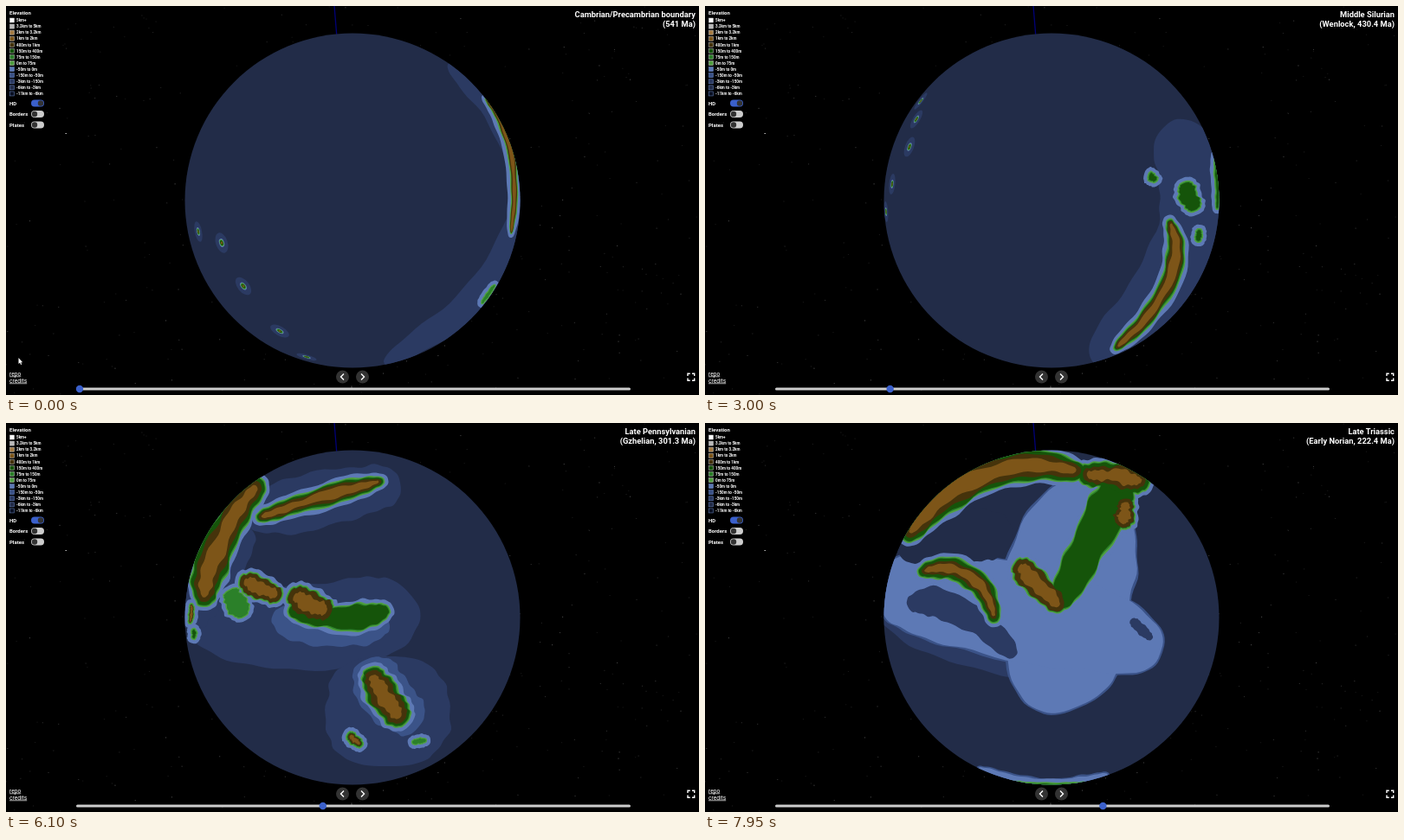
Animation of 800x450 px, one loop 8000 ms. Source, as an HTML page with a canvas:

```html
<!DOCTYPE html>
<html lang="en">
<head>
<meta charset="utf-8">
<title>Paleogeographic globe</title>
<style>
html, body { margin: 0; width: 100%; height: 100%; overflow: hidden; background: #000; }
canvas, svg { position: absolute; left: 0; top: 0; width: 800px; height: 450px; }
text { font: 700 6px Roboto, sans-serif; fill: #fff; }
.legend text { font-size: 4.6px; }
.title { font-size: 9.33px; text-anchor: end; }
.link { font-weight: 400; font-size: 6.67px; text-decoration: underline; }
.icon { fill: none; stroke: #fff; stroke-width: 1.4; }
</style>
</head>
<body>
<canvas width="800" height="450"></canvas>
<svg viewBox="0 0 800 450">
  <text x="4" y="10">Elevation</text>
  <g class="legend" id="legend"></g>
  <g id="toggles"></g>
  <text class="title" x="796" y="13" id="era"></text>
  <text class="title" x="796" y="24" id="stage"></text>
  <text class="link" x="4" y="427.5">repo</text>
  <text class="link" x="4" y="435.5">credits</text>
  <g fill="#333"><circle cx="388.5" cy="429" r="7.5"/><circle cx="411.5" cy="429" r="7.5"/></g>
  <path class="icon" d="M390 425.5l-3.5 3.5 3.5 3.5M410 425.5l3.5 3.5-3.5 3.5"/>
  <path class="icon" d="M787 428v-2.700h2.700M792 425.300h2.700v2.700M794.700 430.500v2.700h-2.700M789.700 433.200h-2.700v-2.700"/>
  <rect x="398.500" y="439.500" width="1" height="3" fill="#555"/>
  <rect x="81" y="441.500" width="640" height="3" rx="1.500" fill="#ccc"/>
  <circle id="thumb" cy="443" r="4.200" fill="#3b60cb"/>
  <path id="cursor" d="M14.500 407v7l1.600-1.400 1 2.300 1.100-.5-1-2.200h2z" fill="#fff"/>
</svg>
<script>
const el = id => document.getElementById(id);
const ctx = document.querySelector('canvas').getContext('2d');
const CX = 400, CY = 225, R = 193.5, TAU = Math.PI * 2;
const DEEP = '#222c48', SHELF = '#2b3a62', SLOPE = '#3b5388', SHOAL = '#5d79b5';
const LOW = '#50a040', MID = '#2b8029', GREEN = '#15540a', HILL = '#45330b', MOUNT = '#7d5518';

[['5km+', '#fff'], ['3.2km to 5km', '#b9b9b9'], ['2km to 3.2km', '#a67c43'], ['1km to 2km', MOUNT],
 ['400m to 1km', HILL], ['150m to 400m', GREEN], ['75m to 150m', MID], ['0m to 75m', LOW],
 ['-50m to 0m', SHOAL], ['-150m to -50m', SLOPE], ['-3km to -150m', SHELF], ['-6km to -3km', DEEP],
 ['-11km to -6km', '#0a1022']].forEach(([label, fill], i) => {
  const y = 16.5 + i * 7.08;
  el('legend').innerHTML += `<rect x="4.500" y="${y - 2.5}" width="5" height="5" fill="${fill}"
    stroke="${i < 8 ? '#ccc' : '#6f8cc8'}" stroke-width=".5"/><text x="12" y="${y + 1.7}">${label}</text>`;
});
['HD', 'Borders', 'Plates'].forEach((label, i) => {
  const y = 112.5 + i * 12.5;
  el('toggles').innerHTML += `<text x="4" y="${y + 2.1}">${label}</text>
    <rect x="29" y="${y - 4}" width="15" height="8" rx="4" fill="${i ? '#ccc' : '#3b60cb'}"/>
    <circle cx="${i ? 33 : 40}" cy="${y}" r="3.200" fill="#333"/>`;
});

const ERAS = `Cambrian/Precambrian boundary|541 Ma
Early Cambrian|Terreneuvian, 530 Ma
Early Cambrian|Stage 3, 520 Ma
Middle Cambrian|Stage 5, 510 Ma
Late Cambrian|Guzhangian, 500 Ma
Late Cambrian|Jiangshanian, 490 Ma
Early Ordovician|Tremadocian, 480 Ma
Early Ordovician|Floian/Dapingianboundary, 470 Ma
Late Ordovician|Sandbian, 460 Ma
Late Ordovician|Katian, 450 Ma
Early Silurian|Rhuddanian, 440 Ma
Middle Silurian|Wenlock, 430.4 Ma
Late Silurian|Pridoli, 421.1 Ma
Early Devonian|Pragian, 409.2 Ma
Early Devonian|Emsian, 400.7 Ma
Middle Devonian|Eifelian, 390.5 Ma
Late Devonian|Frasnian, 380 Ma
Late Devonian|Early Famennian, 370 Ma
Latest Devonian|Late Famennian, 360 Ma
Early Mississippian|Tournaisian, 350 Ma
Middle Mississippian|Visean, 340 Ma
Late Mississippian|Serpukhovian, 330 Ma
Early Pennsylvanian|Bashkirian, 319.2 Ma
Middle Pennsylvanian|Moscovian, 311.1 Ma
Late Pennsylvanian|Gzhelian, 301.3 Ma
Early Permian|Sakmarian, 292.6 Ma
Early Permian|Kungurian, 280 Ma
Middle Permian|Roadian&Wordian, 268.7 Ma
Middle Permian|Capitanian, 262.5 Ma
Permo-Triassic Boundary|252 Ma
Middle Triassic|Anisian, 241.5 Ma
Late Triassic|Carnian, 232.9 Ma
Late Triassic|Early Norian, 222.4 Ma`.split('\n').map(s => s.split('|'));

let seed = 7;
const random = () => (seed = seed * 16807 % 2147483647) / 2147483647;
const lerp = (a, b, k) => a + (b - a) * k;
const stars = Array.from({ length: 400 }, () => [random() * 800, random() * 450, .1 + .25 * random() ** 3]);

// A pose is a bent spine (tip, middle, tip) followed by a half-width.
function readPose(text) {
  const [ax, ay, bx, by, cx, cy, width] = text.split(/[ ,]/).map(Number);
  const center = [(ax + bx + cx) / 3, (ay + by + cy) / 3];
  const spine = [[ax, ay], [bx, by], [cx, cy]].map(p => [p[0] - center[0], p[1] - center[1]]);
  return { center, spine, width };
}

const bodies = [];
function add(kind, relief, first, ...poses) {
  bodies.push({ kind, relief, first, keys: poses.map(readPose), phases: [3, 5, 9, 17].map(f => [f, random() * TAU]) });
}
const shelf = (...args) => add('shelf', 0, ...args);
const shoal = (...args) => add('shoal', 0, ...args);
const land = (...args) => add('land', ...args);
const coast = (...args) => add('coast', 0, ...args);

shelf(0, '511,66 600,240 437,414 20', '535,88 600,240 500,392 46', '530,140 570,270 450,415 50',
  '545,195 490,345 278,385 72', '468,200 370,235 210,228 50', '560,180 430,165 200,150 76', '510,240 370,240 200,200 55');
shelf(3, '240,130 262,125 290,118 9', '275,110 370,87 455,70 32', '400,100 470,120 555,135 30');
shelf(4, '440,270 440,335 440,397 72', '445,270 430,350 440,420 64');
shelf(3, '205,268 220,235 235,208 14', '200,235 225,190 280,120 32');
shelf(4, '510,395 548,372 585,330 9');
shelf(5, '225,310 270,385 365,420 13');
add('slope', 0, 4, '308,222 375,238 442,230 22', '375,180 430,240 520,245 24');
add('slope', 0, 4, '415,274 440,315 476,352 30');
shoal(3, '480,278 492,315 472,352 17');
shoal(5, '468,303 430,350 440,398 46', '460,70 415,210 430,328 74');
shoal(5, '300,170 350,180 400,240 4', '200,195 340,212 526,265 56');
shoal(6, '315,400 395,422 465,407 9');
add('deep', 0, 6, '222,148 290,128 352,140 33');
add('shelf2', 0, 6, '234,212 290,215 358,270 17');
add('shelf2', 0, 6, '492,227 503,238 516,250 6');

land(.7, 0, '553,106 583,170 583,264 5', '556,178 570,262 532,358 11', '535,246 536,318 472,398 11',
  '478,286 412,358 293,384 22', '228,213 246,140 296,64 20', '222,215 270,128 328,48 25', '230,137 320,60 440,58 21');
land(0, 2, '589,170 592,205 591,236 4', '577,297 545,345 495,390 10', '443,214 390,226 325,215 15',
  '536,234 448,205 370,142 32', '485,62 455,120 405,215 24');
land(.85, 4, '325,197 350,209 377,222 17', '372,143 445,180 502,242 13', '356,162 380,182 413,218 16');
land(.85, 4, '268,183 292,190 318,204 14', '387,180 392,198 394,218 9');
land(.65, 3, '257,125 262,125 267,124 4', '288,111 360,87 437,66 12', '385,106 465,126 548,132 19', '430,60 475,62 514,71 18');
land(.75, 4, '420,282 437,317 463,347 19', '477,324 474,350 465,374 10');
land(.6, 4, '393,360 402,366 411,375 7', '382,356 400,352 420,358 13', '245,174 305,176 335,232 14');
land(0, 1, '533,93 545,101 556,110 4', '552,203 559,220 566,238 12', '520,293 512,325 470,352 7');
land(0, 1, '525,124 525,128 525,132 4', '511,195 516,198 521,204 6');
land(0, 2, '571,257 570,265 569,274 5');
land(.5, 3, '212,232 211,246 210,260 5', '214,208 214,220 212,233 4', '209,208 209,222 208,236 4');
land(0, 4, '216,237 217,244 216,251 4');
land(0, 5, '300,140 322,146 335,150 8');
land(0, 5, '452,313 455,317 458,321 5');
land(.8, 6, '485,85 484,105 478,122 13');
land(0, 6, '350,415 400,420 440,416 4');
coast(0, '565,322 556,334 549,345 3');
coast(4, '468,370 477,368 486,367 4', '450,398 475,388 502,380 8');
coast(4, '257,193 265,207 275,225 13', '300,118 365,110 425,103 10');
coast(5, '230,222 255,203 285,182 4');
coast(5, '355,91 370,90 386,91 4');

// Broken archipelagos: short streaks scattered around a point
for (const [x, y, count] of [[335, 130, 9], [425, 385, 7]]) {
  for (let i = 0; i < count; i++) {
    const px = x + (random() - .5) * 75, py = y + (random() - .5) * 40, half = 4 + random() * 12;
    coast(5, `${px - half},${py - 2} ${px},${py} ${px + half},${py + 2} ${1.5 + random() * 3}`);
  }
}

// Volcanic islands, one centre per scene
const ISLANDS = ['222,261 258,255 244,131 262,125', '249,274 284,286 236,163 262,149', '274,324 289,333 216,206 257,180',
  '316,376 283,363 209,238 227,215', '347,406 281,376 249,110 237,132'].map(s => s.split(' ').map(p => p.split(',').map(Number)));

const LAYERS = [['shelf', SHELF], ['slope', SLOPE], ['shoal', SLOPE, 2], ['shoal', SHOAL], ['deep', DEEP], ['shelf2', SHELF]];
const BANDS = [
  ['land coast', SHOAL, () => 4],
  ['land coast', LOW, () => 0],
  ['land coast', MID, () => -1.3],
  ['land', GREEN, () => -2.3],
  ['land', HILL, (w, relief) => w * (relief - 1)],
  ['land', MOUNT, (w, relief) => w * (relief * .62 - 1)]
];
const SCENES = [400, 2000, 3000, 4400, 6100, 6800, 7950];

function scenePosition(t) {
  if (t <= SCENES[0]) return 0;
  const i = SCENES.findIndex(v => v > t);
  return i < 0 ? 6 : i - 1 + (t - SCENES[i - 1]) / (SCENES[i] - SCENES[i - 1]);
}

// Plates drift on an arc around the globe's middle.
function drift(a, b, k) {
  const polar = p => [Math.hypot(p[0] - CX, p[1] - CY), Math.atan2(p[1] - CY, p[0] - CX)];
  const [r0, t0] = polar(a), [r1, t1] = polar(b);
  const turn = Math.atan2(Math.sin(t1 - t0), Math.cos(t1 - t0));
  const r = lerp(r0, r1, k), t = t0 + turn * k;
  return [CX + r * Math.cos(t), CY + r * Math.sin(t)];
}

function poseAt({ first, keys }, s) {
  const u = s - first, last = keys.length - 1;
  const v = Math.max(0, Math.min(last, u)), scale = 1 - Math.abs(u - v);
  if (scale <= 0) return null;
  const i = Math.floor(v), k = v - i, a = keys[i], b = keys[Math.min(last, i + 1)];
  const center = drift(a.center, b.center, k);
  return {
    scale,
    width: lerp(a.width, b.width, k) * scale,
    spine: a.spine.map((p, j) => p.map((n, q) => center[q] + scale * lerp(n, b.spine[j][q], k)))
  };
}

// Rough oval bent along the spine, grown or shrunk by a margin
function outline({ spine: [a, b, c], width, scale }, margin, phases) {
  const path = new Path2D(), half = width + margin * scale;
  if (half < .6) return path;
  const power = (v, e) => Math.sign(v) * Math.abs(v) ** e;
  const amp = Math.min(2, width * .1);
  for (let angle = 0; angle < TAU; angle += TAU / 110) {
    const along = -power(Math.cos(angle), .85), u = (1 + along) / 2;
    const at = q => a[q] * (1 - u) * (1 - 2 * u) + b[q] * 4 * u * (1 - u) + c[q] * u * (2 * u - 1);
    const slope = q => a[q] * (4 * u - 3) + b[q] * (4 - 8 * u) + c[q] * (4 * u - 1);
    const length = Math.hypot(slope(0), slope(1)) || 1, tx = slope(0) / length, ty = slope(1) / length;
    const rough = phases.reduce((sum, [f, p]) => sum + Math.sin(f * angle + p + margin * f * .02), 0) * amp * .6;
    const across = power(Math.sin(angle), .7) * half + Math.sin(angle) * rough, tip = margin * scale * along;
    path.lineTo(at(0) + tx * tip - ty * across, at(1) + ty * tip + tx * across);
  }
  path.closePath();
  return path;
}

function drawIslands(s) {
  if (s >= 4) return;
  for (const keys of ISLANDS) {
    const i = Math.min(2, Math.floor(s)), [x, y] = drift(keys[i], keys[i + 1], Math.min(1, s - i));
    const r = Math.hypot(x - CX, y - CY), tilt = Math.atan2(y - CY, x - CX);
    const size = 12 * Math.min(1, 4 - s), squash = Math.max(.2, Math.sqrt(Math.max(0, 1 - (r / R) ** 2)));
    for (const [scale, color] of [[1, SHELF], [.42, SHOAL], [.34, LOW], [.26, GREEN], [.14, MOUNT]]) {
      ctx.fillStyle = color;
      ctx.beginPath();
      ctx.ellipse(x, y, size * scale * squash, size * scale, tilt, 0, TAU);
      ctx.fill();
    }
  }
}

function drawGlobe(s) {
  ctx.fillStyle = '#000';
  ctx.fillRect(0, 0, 800, 450);
  for (const [x, y, a] of stars) {
    ctx.fillStyle = `rgba(255,255,255,${a})`;
    ctx.fillRect(x, y, 1, 1);
  }
  ctx.fillStyle = '#bbb';
  ctx.fillRect(68.5, 147, 1.5, 1);
  ctx.strokeStyle = '#000078';
  ctx.lineWidth = 1.3;
  ctx.beginPath();
  ctx.moveTo(379, 0);
  ctx.lineTo(381.7, 33);
  ctx.stroke();
  ctx.save();
  ctx.beginPath();
  ctx.arc(CX, CY, R, 0, TAU);
  ctx.fillStyle = DEEP;
  ctx.fill();
  ctx.clip();
  const shown = bodies.map(body => ({ ...body, pose: poseAt(body, s) })).filter(body => body.pose);
  const paint = (kinds, color, margin) => {
    ctx.fillStyle = color;
    for (const { kind, pose, relief, phases } of shown) {
      if (kinds.split(' ').includes(kind)) ctx.fill(outline(pose, margin(pose.width / pose.scale, relief), phases));
    }
  };
  for (const [kind, color, margin = 0] of LAYERS) paint(kind, color, () => margin);
  drawIslands(s);
  for (const band of BANDS) paint(...band);
  ctx.restore();
}

const start = performance.now();
function frame() {
  const t = (performance.now() - start) % 8000;
  const step = t < 400 ? 0 : Math.min(32, Math.floor((t - 160) / 240));
  drawGlobe(scenePosition(t));
  el('era').textContent = ERAS[step][0];
  el('stage').textContent = `(${ERAS[step][1]})`;
  el('thumb').setAttribute('cx', 85 + 11.7 * step);
  el('cursor').style.display = t < 100 ? '' : 'none';
  requestAnimationFrame(frame);
}
frame();
</script>
</body>
</html>
```
